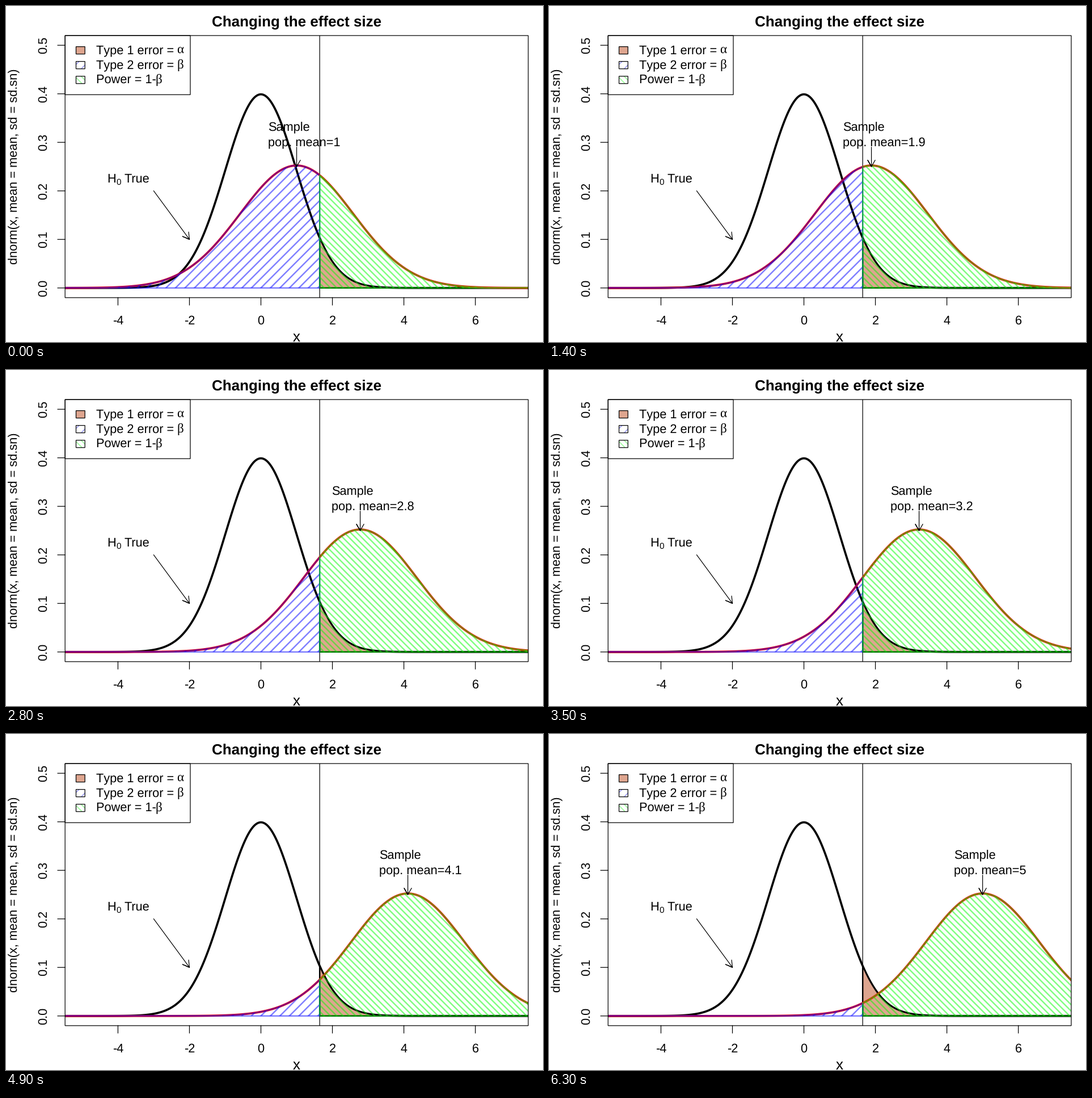
Recreate the animation shown at these times as a matplotlib script. Size 947 by 592 pixels, loop 7 s.

```python
import numpy as np
import matplotlib.pyplot as plt
from matplotlib.animation import FuncAnimation
from matplotlib.collections import LineCollection
from matplotlib.patches import Polygon, Rectangle

W, H, DPI = 947, 592, 100
INCH = W / 8          # the plot is laid out as an 8 x 5 inch page
CEX = 1.1
EM = CEX * INCH / 6   # 12 point text
LINE = CEX * INCH / 5  # one margin line
LEFT, TOP, RIGHT, BOTTOM = 4 * LINE, 2 * LINE, W - LINE, H - 3 * LINE
XLIM, YLIM = (-5.48, 7.48), (-0.02, 0.52)
SX = (RIGHT - LEFT) / (XLIM[1] - XLIM[0])
SY = (BOTTOM - TOP) / (YLIM[1] - YLIM[0])
PT = 72 / DPI
LWD = INCH / 96 * PT  # one line-width unit in points
CRIT, SD = 1.645, np.sqrt(2.5)
FRAMES, STEP = 10, 700
BLUE, GREEN, SALMON = (0, 0, 1, 0.5), (0, 1, 0, 0.5), "#dea58f"

plt.rcParams.update({
    "font.family": "Liberation Sans",
    "text.hinting": "no_hinting",
    "text.kerning_factor": 6,
    "path.simplify": False,
    "path.snap": False,
})

fig = plt.figure(figsize=(W / DPI, H / DPI), dpi=DPI, facecolor="white")
ax = fig.add_axes([LEFT / W, 1 - BOTTOM / H, (RIGHT - LEFT) / W, (BOTTOM - TOP) / H])
ax.set(xlim=XLIM, ylim=YLIM)
ax.axis("off")


def px(x):
    return LEFT + (x - XLIM[0]) * SX


def py(y):
    return BOTTOM - (y - YLIM[0]) * SY


def ux(p):
    return XLIM[0] + (p - LEFT) / SX


def uy(p):
    return YLIM[0] + (BOTTOM - p) / SY


def label(x, y, s, size=EM, **kw):
    kw = {"va": "baseline", "ha": "left", "zorder": 10, **kw}
    return fig.text(x / W, 1 - y / H, s, fontsize=size * PT, **kw)


def stroke(xs, ys):
    """Thin black line in pixels, free of the plot's clip box."""
    ax.plot(ux(np.array(xs)), uy(np.array(ys)), color="black", lw=LWD,
            clip_on=False, zorder=9)


def box(x0, y0, x1, y1, face, zorder):
    ax.add_patch(Rectangle((ux(x0), uy(y1)), (x1 - x0) / SX, (y1 - y0) / SY,
                           facecolor=face, edgecolor="black", linewidth=LWD,
                           clip_on=False, zorder=zorder))


def dnorm(x, mean=0.0, sd=1.0):
    return np.exp(-((x - mean) / sd) ** 2 / 2) / (sd * np.sqrt(2 * np.pi))


def area(lo, hi, mean, sd):
    x = np.linspace(lo, hi, 300)
    return np.vstack([[lo, 0], np.column_stack([x, dnorm(x, mean, sd)]), [hi, 0]])


def hatch(density, slope, color, lwd, zorder):
    """Diagonal lines that cross y = 0 at whole multiples of the spacing."""
    gap = INCH / density * np.sqrt(2)
    t = np.array([-20, 480])
    segs = [np.column_stack([(k * gap + slope * t) / SX, t / SY])
            for k in range(int(-900 / gap), int(1000 / gap))]
    lines = LineCollection(segs, colors=[color], linewidths=lwd * LWD, zorder=zorder)
    ax.add_collection(lines, autolim=False)
    return lines


def region(color, zorder):
    shape = Polygon([[0, 0], [1, 0], [1, 1]], fill=False, edgecolor=color,
                    linewidth=2 * LWD, joinstyle="round", zorder=zorder)
    return ax.add_patch(shape)


def arrow(p, q):
    """Shaft with an open head, given in pixels."""
    p, q = np.array(p), np.array(q)
    back = np.arctan2(*(p - q)[::-1])
    arms = [q + 0.11 * INCH * np.array([np.cos(a), np.sin(a)])
            for a in (back - np.pi / 6, back + np.pi / 6)]
    pts = np.array([p, q, arms[0], q, arms[1]])
    return ux(pts[:, 0]), uy(pts[:, 1])


# Frame, ticks and axis text
box(LEFT, TOP, RIGHT, BOTTOM, "none", 9)
label((LEFT + RIGHT) / 2, 36, "Changing the effect size", 1.2 * EM,
      ha="center", weight="bold")
label((LEFT + RIGHT) / 2, 591, "x", 1.2 * EM, ha="center")
label(15, (TOP + BOTTOM) / 2, "dnorm(x, mean = mean, sd = sd.sn)",
      rotation=90, ha="center", va="center")
for v in range(-4, 7, 2):
    stroke([px(v)] * 2, [BOTTOM, BOTTOM + LINE / 2])
    label(px(v), 561, f"{v}", ha="center")
for v in np.arange(6) / 10:
    stroke([LEFT, LEFT - LINE / 2], [py(v)] * 2)
    label(66, py(v), f"{v:.1f}", rotation=90, ha="center", va="center")

# Fixed curve, rejection area and threshold
xs = np.linspace(-6, 8, 500)
ax.plot(xs, dnorm(xs), color="black", lw=3 * LWD, zorder=2)
ax.add_patch(Polygon(area(CRIT, 9, 0, 1), facecolor=SALMON, edgecolor="black",
                     linewidth=2 * LWD, joinstyle="round", zorder=2.1))
ax.axvline(CRIT, color="black", lw=LWD, zorder=2.2)

# Moving curve and its two areas
curve, = ax.plot([], [], color="red", lw=3 * LWD, zorder=3)
blue_lines = hatch(10, 1, BLUE, 2, 3.1)
blue_edge = region(BLUE, 3.2)
green_lines = hatch(15, -1, GREEN, 2, 3.3)
green_edge = region(GREEN, 3.4)

# Annotations
label(178.5, 311, "H")
label(194.5, 315, "0", 0.7 * EM)
label(208.5, 311, "True")
ax.plot(*arrow((px(-3), py(0.2)), (px(-2), py(0.1))), color="black", lw=LWD, zorder=5)
pointer, = ax.plot([], [], color="black", lw=LWD, zorder=5)
top_text = label(0, 220, "Sample")
mean_text = label(0, 246, "")

# Legend
box(LEFT, TOP, 325, TOP + 4 * LINE, "white", 6)
rows = [("Type 1 error = ", "α", 301.5), ("Type 2 error = ", "β", 301.5),
        ("Power = 1-", "β", 263.5)]
fills = [None, (10, 1, BLUE), (15, -1, GREEN)]
for i, ((words, greek, gx), fill) in enumerate(zip(rows, fills)):
    y = TOP + (i + 1) * LINE
    x0, x1, y0, y1 = 123.5, 139.2, y - LINE / 4, y + LINE / 4
    label(158.5, y + 6, words)
    label(gx, y + 6, greek, 1.06 * EM, family="Liberation Serif")
    box(x0, y0, x1, y1, "none" if fill else SALMON, 8)
    if fill:
        corners = [(x0, y0), (x1, y0), (x1, y1), (x0, y1)]
        hatch(*fill, 1, 7).set_clip_path(
            Polygon([(ux(a), uy(b)) for a, b in corners], transform=ax.transData))


def update(i):
    mean = 1 + 4 * i / (FRAMES - 1)
    curve.set_data(xs, dnorm(xs, mean, SD))
    for edge, lines, lo, hi in ((blue_edge, blue_lines, -9, CRIT),
                                (green_edge, green_lines, CRIT, 12)):
        edge.set_xy(area(lo, hi, mean, SD))
        lines.set_clip_path(edge)
    pointer.set_data(*arrow((px(mean), py(0.29)), (px(mean), py(0.25))))
    for text in (top_text, mean_text):
        text.set_x(px(mean - 0.8) / W)
    mean_text.set_text(f"pop. mean={round(mean, 1):g}")
    return ()


anim = FuncAnimation(fig, update, frames=FRAMES, init_func=lambda: (),
                     interval=STEP, repeat=True, repeat_delay=0)
plt.show()
```
